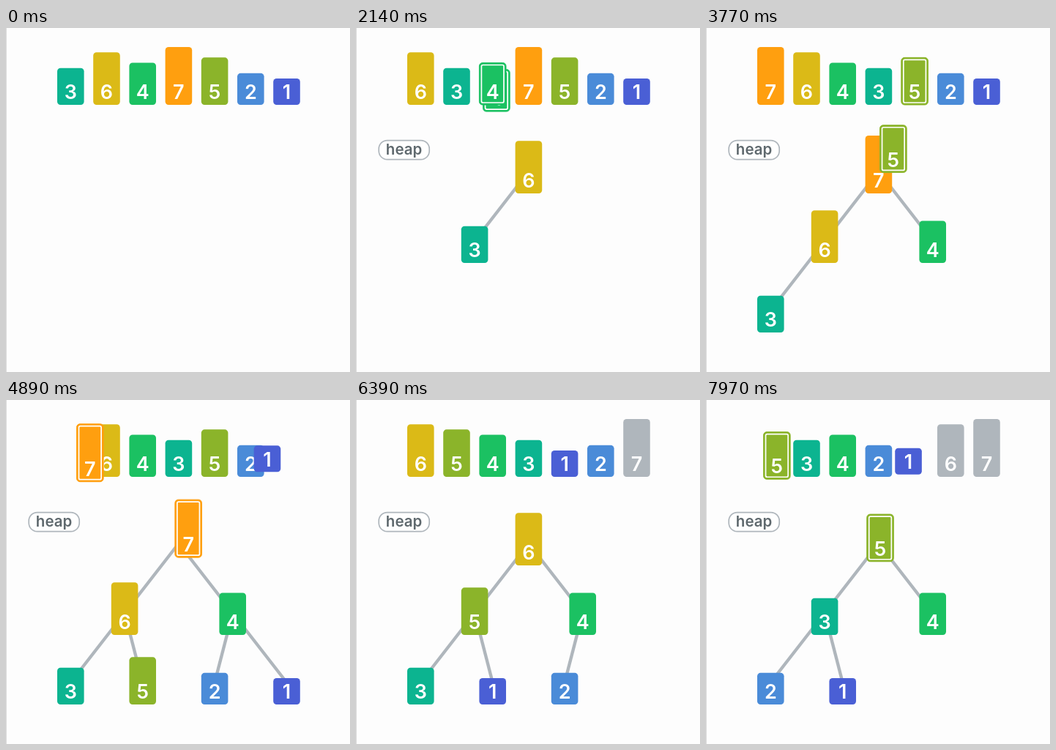
Animation of 470x470 px, one loop 8 s. Source, as an HTML page:

```html
<!DOCTYPE html>
<html lang="en">
<head>
<meta charset="utf-8">
<title>Heap sort</title>
<style>
  html, body { margin: 0; height: 100%; overflow: hidden; background: #fdfdfd; }
  svg { display: block; width: 100vw; height: 100vh; }
  text { font-family: Inter, "Open Sans", sans-serif; font-weight: 600; text-anchor: middle; }
</style>
</head>
<body>
<svg id="stage" viewBox="0 0 470 470"></svg>
<script>
const LOOP = 8000, MOVE = 345, ARC = 24, BAR = 36.6;
const GRAY = '#afb6bc';
const COLORS = ['', '#4a5fd5', '#4a8bd8', '#0cb490', '#1bc162', '#8bb42a', '#dbba17', '#ff9f0f'];
const stage = document.getElementById('stage');

const arraySlot = i => ({ x: 88.3 + 49.2 * i, y: 105 });
function treeSlot(i) {
  const level = Math.floor(Math.log2(i + 1));
  const column = i + 1 - 2 ** level;
  const x = [235.9, 162.1 + 147.6 * column, 88.3 + 98.4 * column][level];
  return { x, y: 226 + 95 * level };
}
const parentOf = i => (i - 1) >> 1;

// Run the algorithm once and record every move it makes.
const values = [3, 6, 4, 7, 5, 2, 1];
const steps = [];
function record(kind, size, live, from, to) {
  steps.push({ kind, size, live, from, to, order: [...values] });
}
function swap(a, b) {
  [values[a], values[b]] = [values[b], values[a]];
}
function insert(k) {
  record('insert', k, 7, k, k);
  for (let i = k; i > 0 && values[parentOf(i)] < values[i]; i = parentOf(i)) {
    record('swap', k + 1, 7, i, parentOf(i));
    swap(i, parentOf(i));
  }
}
function extract(size) {
  const last = size - 1;
  record('extract', size, size, 0, last);
  swap(0, last);
  record('promote', size, last, last, 0);
  for (let i = 0; 2 * i + 1 < last;) {
    let child = 2 * i + 1;
    if (child + 1 < last && values[child + 1] > values[child]) child++;
    if (values[child] < values[i]) break;
    record('swap', last, last, i, child);
    swap(i, child);
    i = child;
  }
}
values.forEach((_, k) => insert(k));
for (const size of [7, 6, 5]) extract(size);

const startOf = i => i < 10 ? 970 + 385.5 * i : 4860 + 387 * (i - 10);

function between(a, b, p, bend = 0) {
  return {
    x: a.x + (b.x - a.x) * p,
    y: a.y + (b.y - a.y) * p + bend * Math.sin(Math.PI * p)
  };
}
function exchange(slot, a, b, p) {
  return between(slot(a), slot(b), p, b > a ? ARC : -ARC);
}

function bar({ value, x, y, hot, gray }) {
  const h = 28.8 + 7.17 * value, left = x - BAR / 2, top = y - h;
  const fill = gray ? GRAY : COLORS[value];
  const outline = hot ? ` stroke="${fill}"` : '';
  const ring = hot ? `<rect x="${left + 3}" y="${top + 3}" width="${BAR - 6}" height="${h - 6}"
    rx="2" fill="none" stroke="#fff" stroke-width="1.7"/>` : '';
  return `<rect x="${left}" y="${top}" width="${BAR}" height="${h}" rx="4.5" fill="${fill}"${outline}/>
    ${ring}<text x="${x}" y="${y - 7.8}" font-size="27" fill="#fff">${value}</text>`;
}
const paint = bars => bars.sort((a, b) => a.layer - b.layer).map(bar).join('');

function edge(i) {
  const a = treeSlot(parentOf(i)), b = treeSlot(i);
  return `<line x1="${a.x}" y1="${a.y - 30}" x2="${b.x}" y2="${b.y - 30}"
    stroke="${GRAY}" stroke-width="4.4"/>`;
}

function arrayBars(step, active, p) {
  const { kind, from, to, order, live } = step;
  const hotIndex = kind === 'promote' ? to : from;
  return order.map((value, i) => {
    const moving = active && (kind === 'swap' || kind === 'extract') && (i === from || i === to);
    const hot = active && i === hotIndex;
    const place = moving ? exchange(arraySlot, i, i === from ? to : from, p) : arraySlot(i);
    return { value, ...place, hot, gray: i >= live, layer: hot ? 2 : +moving };
  });
}

function treeBars(step, active, p) {
  const { kind, from, to, order, size } = step;
  const bars = [];
  for (let i = 0; i < size; i++) {
    if (kind === 'promote' && i === 0) continue;
    const hot = active && i === from;
    let value = order[i], place = treeSlot(i), layer = 0;
    if (kind === 'promote' && i === from) value = order[0];
    if (active && (i === from || kind === 'swap' && i === to)) {
      layer = hot ? 2 : 1;
      if (kind === 'swap') place = exchange(treeSlot, i, i === from ? to : from, p);
      if (kind === 'extract') place = between(place, arraySlot(to), p);
      if (kind === 'promote') place = between(place, treeSlot(0), p);
    }
    bars.push({ value, ...place, hot, layer });
  }
  if (active && kind === 'insert') {
    bars.push({ value: order[from], ...between(arraySlot(from), treeSlot(from), p), hot: true, layer: 2 });
  }
  return bars;
}

const label = `<rect x="31.2" y="153.6" width="69" height="26" rx="11.5" fill="#fff"
  stroke="${GRAY}" stroke-width="1.7"/><text x="65.6" y="172.6" font-size="20.5" fill="#5e686d">heap</text>`;

function render(t) {
  let index = -1;
  while (index + 1 < steps.length && startOf(index + 1) <= t) index++;
  const p = index < 0 ? 1 : (t - startOf(index)) / MOVE;
  const active = p < 1;
  const step = steps[active ? index : Math.min(index + 1, steps.length - 1)];

  const edgeCount = step.size - (active && step.kind === 'promote' ? 1 : 0);
  let svg = '<rect width="1" height="470" fill="#dedede"/>';
  if (index >= 0) svg += label;
  for (let i = 1; i < edgeCount; i++) svg += edge(i);
  stage.innerHTML = svg + paint(treeBars(step, active, p)) + paint(arrayBars(step, active, p));
}

const begin = performance.now();
function tick() {
  render((performance.now() - begin) % LOOP);
  requestAnimationFrame(tick);
}
tick();
</script>
</body>
</html>
```
